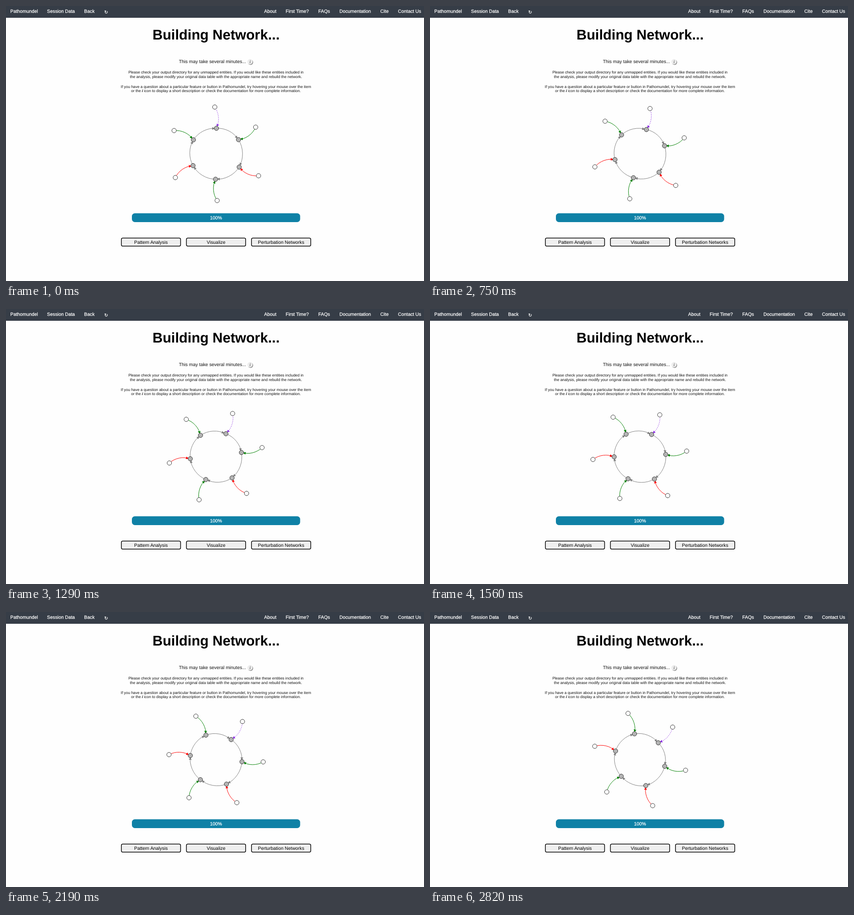
Animation of 923 by 607 pixels, one loop 2920 ms. Source, as an HTML page:

```html
<!DOCTYPE html>
<html lang="en">
<head>
<meta charset="utf-8">
<title>Building Network</title>
<style>
  html, body { margin: 0; width: 100%; height: 100%; overflow: hidden; background: #fefefe; }
  svg { display: block; width: 923px; height: 607px; }
  text {
    font-family: "Liberation Sans", Arial, sans-serif;
    font-size: 10.35px;
    text-rendering: geometricPrecision;
  }
  .mid { text-anchor: middle; }
  .light { fill: #fff; stroke: #fff; stroke-width: 0.25; }
  .note { font-size: 8.41px; fill: #111; }
  .button { fill: #efefef; stroke: #000; stroke-width: 1.5; }
</style>
</head>
<body>
<svg viewBox="0 0 923 607">
  <defs id="defs"></defs>

  <rect width="923" height="26" fill="#363d47"/>
  <g id="nav" class="light"></g>

  <text class="mid" x="463.9" y="74" style="font-size:31px;font-weight:bold">Building Network...</text>
  <text x="381.7" y="126.2" fill="#111">This may take several minutes...</text>

  <circle cx="540" cy="124.2" r="5.7" fill="#8c8c8c"/>
  <circle cx="538.8" cy="123" r="5.7" fill="#ececec"/>
  <text class="mid" x="539.1" y="126.3" fill="#777"
    style="font-family:'Liberation Serif',serif;font-style:italic;font-weight:bold;font-size:9.5px">i</text>

  <g class="mid">
    <text class="note" x="463.6" y="149.4">Please check your output directory for any unmapped entities. If you would like these entities included in</text>
    <text class="note" x="463.6" y="159.2">the analysis, please modify your original data table with the appropriate name and rebuild the network.</text>
    <text class="note" x="463.6" y="180.5">If you have a question about a particular feature or button in Pathomundel, try hovering your mouse over the item</text>
    <text class="note" x="463.6" y="190.3">or the <tspan font-weight="bold" font-style="italic">i</tspan> icon to display a short description or check the documentation for more complete information.</text>
  </g>

  <g id="links" fill="none"></g>
  <g id="nodes" stroke="#333"></g>

  <rect x="278" y="457.5" width="371.5" height="19.5" rx="6.5" fill="#0f81a6"/>
  <text class="mid light" x="463.8" y="470.6">100%</text>
  <g id="buttons" class="mid"></g>
</svg>

<script>
const SVG_NS = "http://www.w3.org/2000/svg";
const LOOP = 2920;
const CENTER = { x: 463.7, y: 325.2 };

// Spokes clockwise from the top: [angle, radius] of the ring node and of its outer node;
// slack is how far the spoke gives way when the network swells.
const SPOKES = [
  { color: "blueviolet", ring: [1, 54.4], outer: [-1.5, 101.3], slack: 0.9, dash: "2 2" },
  { color: "green", ring: [58.8, 56.7], outer: [56.6, 103.4], slack: 1.5 },
  { color: "red", ring: [120.6, 59.3], outer: [117.8, 106], slack: 0.2 },
  { color: "green", ring: [181, 55.8], outer: [178.6, 102.8], slack: 1.4 },
  { color: "red", ring: [241.9, 57], outer: [239.2, 104], slack: 0.5 },
  { color: "green", ring: [300.9, 57.6], outer: [298.5, 104.8], slack: 0.5 }
];

// [time, rotation in degrees, swell]
const POSES = [
  [0, 0, 1], [300, 6.9, 0.6], [750, 14.1, 0], [1110, 19.8, 0],
  [1560, 27, 0.2], [1920, 32.1, 1], [2460, 40.9, 0.2], [2820, 46.9, 0]
];

const byId = id => document.getElementById(id);

function add(parent, tag, attrs, text) {
  const el = document.createElementNS(SVG_NS, tag);
  for (const key in attrs) el.setAttribute(key, attrs[key]);
  if (text) el.textContent = text;
  return parent.appendChild(el);
}

function buildPage() {
  const items = {
    "Pathomundel": 9.6, "Session Data": 90.6, "Back": 172.6,
    "About": 570, "First Time?": 617.6, "FAQs": 689.6,
    "Documentation": 736.2, "Cite": 826.6, "Contact Us": 865.6
  };
  for (const label in items) add(byId("nav"), "text", { x: items[label], y: 14.6 }, label);
  add(byId("nav"), "text", {
    x: 221.3, y: 17, class: "mid", style: "font-family:'DejaVu Sans',sans-serif;font-size:10px"
  }, "↻");

  ["Pattern Analysis", "Visualize", "Perturbation Networks"].forEach((label, i) => {
    const x = 254.7 + 143.7 * i;
    add(byId("buttons"), "rect", { class: "button", x, y: 512.3, width: 130.8, height: 17.6, rx: 3 });
    add(byId("buttons"), "text", { x: x + 65.4, y: 524.6 }, label);
  });
}

function addLink(color, dash = "none") {
  return add(byId("links"), "path", {
    stroke: color, "stroke-dasharray": dash, "marker-end": `url(#tip-${color})`
  });
}

function buildNetwork() {
  for (const color of ["gray", "blueviolet", "green", "red"]) {
    const marker = add(byId("defs"), "marker", {
      id: "tip-" + color, viewBox: "0 -5 10 10", refX: 15.7, refY: -1.5,
      markerWidth: 6, markerHeight: 6, markerUnits: "userSpaceOnUse", orient: "auto"
    });
    add(marker, "path", { d: "M0,-5L10,0L0,5Z", fill: color });
  }
  for (const spoke of SPOKES) {
    spoke.ringLink = addLink("gray");
    spoke.outerLink = addLink(spoke.color, spoke.dash);
    spoke.ringDot = add(byId("nodes"), "circle", { r: 4.9, fill: "#b4b4b4" });
    spoke.outerDot = add(byId("nodes"), "circle", { r: 4.9, fill: "#fff" });
  }
}

function poseAt(time) {
  const next = Math.max(1, POSES.findIndex(pose => pose[0] >= time));
  const a = POSES[next - 1], b = POSES[next];
  const k = (time - a[0]) / (b[0] - a[0]);
  return { turn: a[1] + (b[1] - a[1]) * k, swell: a[2] + (b[2] - a[2]) * k };
}

function place([angle, radius], slack, { turn, swell }) {
  const rad = (angle + turn) * Math.PI / 180;
  const r = radius + slack * swell;
  return { x: CENTER.x + r * Math.sin(rad), y: CENTER.y - r * Math.cos(rad) };
}

// Arc whose radius equals its chord, bulging clockwise.
function arc(from, to) {
  const r = Math.hypot(to.x - from.x, to.y - from.y);
  return `M${from.x},${from.y}A${r},${r} 0 0 1 ${to.x},${to.y}`;
}

function moveDot(dot, point) {
  dot.setAttribute("cx", point.x);
  dot.setAttribute("cy", point.y);
}

// The picture advances in 90 ms steps, with one longer hold near the start.
function steppedTime(t) {
  if (t < 90) return 0;
  if (t < 300) return 90;
  return Math.min(2820, 300 + 90 * Math.floor((t - 300) / 90));
}

function draw(t) {
  const pose = poseAt(steppedTime(t));
  const ring = SPOKES.map(spoke => place(spoke.ring, spoke.slack, pose));
  SPOKES.forEach((spoke, i) => {
    const outer = place(spoke.outer, spoke.slack, pose);
    spoke.ringLink.setAttribute("d", arc(ring[i], ring[(i + 1) % ring.length]));
    spoke.outerLink.setAttribute("d", arc(outer, ring[i]));
    moveDot(spoke.ringDot, ring[i]);
    moveDot(spoke.outerDot, outer);
  });
}

buildPage();
buildNetwork();
draw(0);
const start = performance.now();
(function tick() {
  draw((performance.now() - start) % LOOP);
  requestAnimationFrame(tick);
})();
</script>
</body>
</html>
```
